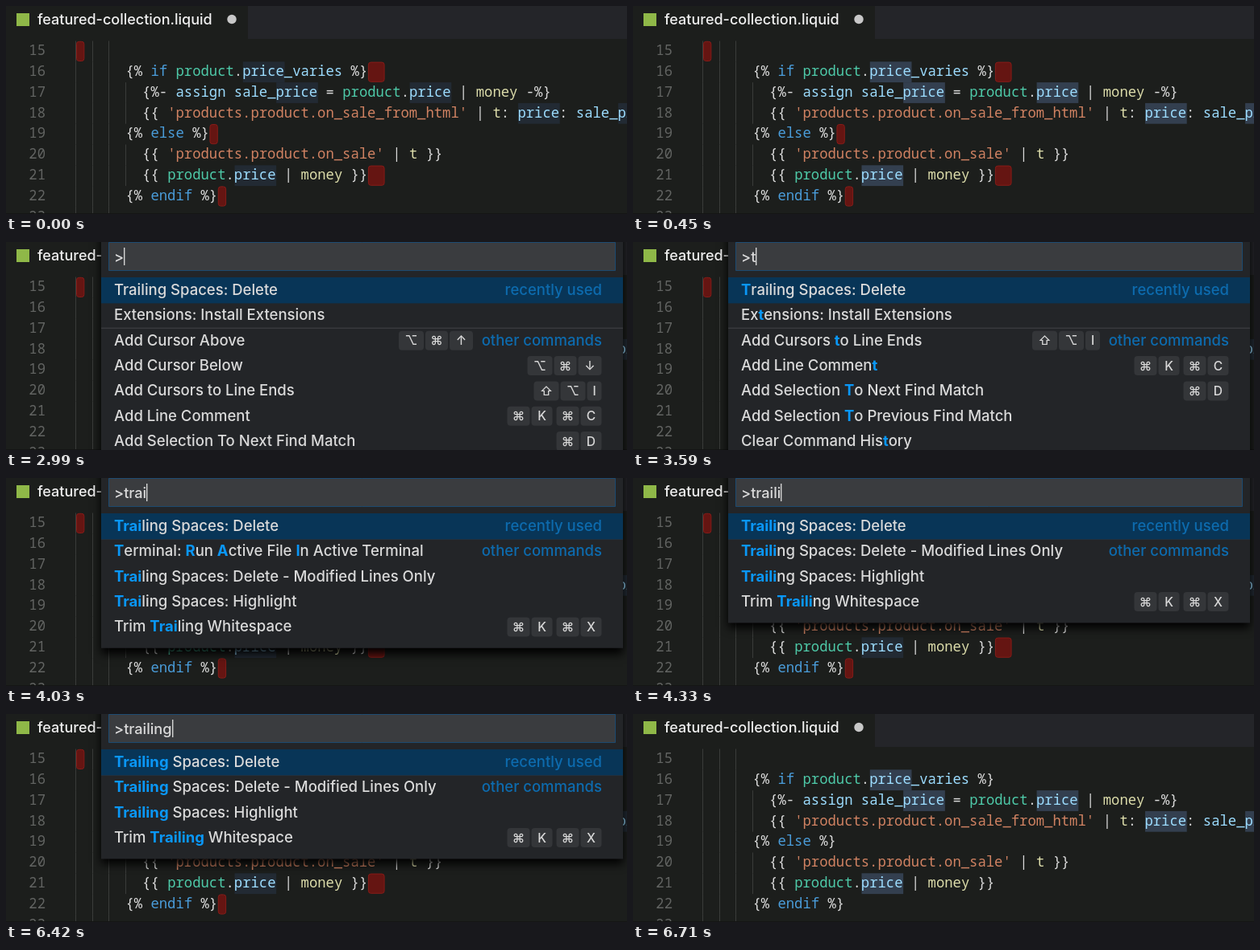
An HTML page with a canvas that plays this animation: 770 px wide and 259 px high, repeating every 9110 ms.

```html
<!DOCTYPE html>
<html lang="en">
<head>
<meta charset="utf-8">
<title>Trailing spaces</title>
<style>
  html, body { margin: 0; height: 100%; overflow: hidden; background: #1c1e1c; }
  canvas { display: block; }
</style>
</head>
<body>
<canvas id="stage" width="770" height="259"></canvas>
<script>
const ctx = document.getElementById('stage').getContext('2d');
const LOOP = 9110;
const CHAR = 10.34, LINE = 25.8, FIRST_TOP = 43.5, CODE_X = 87;
const ROW = 31.35, LIST_TOP = 44, PANEL = { left: 118, right: 765 };
const MONO = '17.23px "Noto Sans Mono", "DejaVu Sans Mono", monospace';
const UI = 'Inter, "DejaVu Sans", sans-serif';

// Code lines: indent in characters, text, number of trailing spaces
const lines = [
  [0, '', 1],
  [6, '{% if product.price_varies %}', 2],
  [8, '{%- assign sale_price = product.price | money -%}', 0],
  [8, "{{ 'products.product.on_sale_from_html' | t: price: sale_price }}", 0],
  [6, '{% else %}', 1],
  [8, "{{ 'products.product.on_sale' | t }}", 0],
  [8, '{{ product.price | money }}', 2],
  [6, '{% endif %}', 1],
  [0, '', 0],
];
const syntax = [
  [/^'/, '#d08262'],
  [/^(if|else|endif)$/, '#4a9cd9'],
  [/^product$/, '#4ec9a8'],
  [/^(money|t)$/, '#dcdcaa'],
  [/^\w/, '#9cdcfe'],
  [/./, '#dcdcdc'],
];

// Palette rows: label with *matched* letters, then shortcut chords
const cursorEnds = ['Add Cursors *t*o Line Ends', '⇧⌥I'];
const lineComment = ['Add Line Commen*t*', '⌘K ⌘C'];
const nextMatch = ['Add Selection *T*o Next Find Match', '⌘D'];
const plain = ([label, keys]) => [label.replaceAll('*', ''), keys];

function paletteRows(typed) {
  const hit = `*${'Trailing'.slice(0, typed.length)}*${'Trailing'.slice(typed.length)}`;
  const top = [hit + ' Spaces: Delete'];
  switch (typed) {
    case '': return [
      ['Trailing Spaces: Delete'], ['Extensions: Install Extensions'],
      ['Add Cursor Above', '⌥⌘↑'], ['Add Cursor Below', '⌥⌘↓'],
      ...[cursorEnds, lineComment, nextMatch].map(plain)];
    case 't': return [
      top, ['Ex*t*ensions: Install Extensions'], cursorEnds, lineComment, nextMatch,
      ['Add Selection *T*o Previous Find Match'], ['Clear Command His*t*ory']];
    case 'tr': return [
      top, ['*T*asks: *R*erun Last Task'], ['*T*asks: *R*un Build Task', '⇧⌘B'],
      ['*T*asks: *R*un Task'], ['*T*asks: *R*un Test Task'],
      ['*T*erminal: *R*ename'], ['*T*erminal: *R*un Active File In Active Terminal']];
  }
  const rows = [top, [hit + ' Spaces: Delete - Modified Lines Only'],
    [hit + ' Spaces: Highlight'], [`Trim ${hit} Whitespace`, '⌘K ⌘X']];
  if (typed === 'trai')
    rows.splice(1, 0, ['*T*erminal: *R*un *A*ctive File *I*n Active Terminal']);
  return rows;
}

// Palette states: start time, typed text, caret visible
const states = [
  [1500, '', true], [2540, '', false], [2990, '', true],
  [3590, 't', true], [3740, 'tr', true], [4030, 'trai', true],
  [4180, 'trail', true], [4330, 'traili', true], [4630, 'trailin', true],
  [4930, 'trailing', true], [5970, 'trailing', false], [6420, 'trailing', true],
];

function rect(x, y, w, h, color) {
  ctx.fillStyle = color;
  ctx.fillRect(x, y, w, h);
}

function roundRect(x, y, w, h, r, fill, stroke) {
  ctx.beginPath();
  ctx.roundRect(x, y, w, h, r);
  ctx.fillStyle = fill;
  ctx.fill();
  if (!stroke) return;
  ctx.strokeStyle = stroke;
  ctx.stroke();
}

function text(str, x, y, color, font, align = 'left') {
  ctx.font = font;
  ctx.fillStyle = color;
  ctx.textAlign = align;
  ctx.fillText(str, x, y);
  return ctx.measureText(str).width;
}

const uiFont = (size = 18.5, weight = 500) => `${weight} ${size}px ${UI}`;

function drawCode(highlight, showTrailing) {
  rect(0, 0, 770, 259, '#1c1e1c');
  lines.forEach(([indent, code, trailing], i) => {
    const top = FIRST_TOP + i * LINE, base = top + 17.7;
    const x = CODE_X + indent * CHAR;
    text(15 + i, 49, base, '#626462', MONO, 'right');
    const guides = indent === 8 ? 4 : 3;
    for (let g = 0; g < guides; g++)
      rect(Math.round(CODE_X + g * 2 * CHAR) - 1, top, 1, LINE, '#3a3c3a');
    for (const m of code.matchAll(/price/g))
      rect(x + m.index * CHAR, top, 5 * CHAR, LINE, highlight);
    for (const m of code.matchAll(/'[^']*'|\w+|[^\w\s']+/g)) {
      const color = syntax.find(([re]) => re.test(m[0]))[1];
      text(m[0], x - .6 + m.index * CHAR, base, color, '500 ' + MONO);
    }
    if (showTrailing && trailing)
      roundRect(x + code.length * CHAR + .5, top + .8, trailing * CHAR - 1, LINE - 1.6, 3, '#651512', '#861c18');
  });
  rect(0, 258, 770, 1, '#141514');
}

function drawTabs() {
  rect(0, 0, 300, 41, '#1c1e1c');
  rect(300, 0, 470, 41, '#242529');
  rect(13, 9, 16, 16, '#8fb848');
  text('featured-collection.liquid', 39, 22.7, '#f0f0f0', uiFont(18));
  ctx.beginPath();
  ctx.arc(280, 16.5, 5.7, 0, 7);
  ctx.fillStyle = '#c8c8c8';
  ctx.fill();
}

function keyWidth(key) {
  if (key === 'I') return 18;
  if (key === '⌘') return 28;
  if ('⌥⇧'.includes(key)) return 31;
  return '↑↓'.includes(key) ? 29 : 26;
}

function drawKeys(keys, right, mid) {
  for (const key of [...keys].reverse()) {
    if (key === ' ') { right -= 3; continue; }
    const w = keyWidth(key);
    roundRect(right - w, mid - 12, w, 24, 4, '#343639');
    text(key, right - w / 2, mid + 5.7, '#d8d8d8', uiFont(15.6), 'center');
    right -= w + 2;
  }
}

function drawPalette(typed, caret) {
  const rows = paletteRows(typed);
  const { left, right } = PANEL, width = right - left;
  const otherStart = typed.length < 2 ? 2 : 1;

  ctx.save();
  ctx.shadowColor = '#000';
  ctx.shadowBlur = 11;
  ctx.shadowOffsetY = 7;
  rect(left, -20, width, LIST_TOP + rows.length * ROW + 31, '#232528');
  ctx.restore();

  roundRect(127.5, .5, 628, 35, 0, '#3a3c3f', '#1c4a70');
  const end = 134 + text('>' + typed, 134, 25, '#dadada', uiFont(18.2));
  if (caret) rect(Math.round(end), 7, 1.4, 22, '#d4d4d4');

  rect(left, LIST_TOP + otherStart * ROW, width, 1, '#434348');
  rect(left, LIST_TOP, width, ROW + 1, '#083557');
  rows.forEach(([label, keys], i) => {
    const top = LIST_TOP + i * ROW, base = top + 22;
    let x = 134;
    label.split('*').forEach((part, n) => {
      const matched = n % 2;
      x += text(part, x, base, matched ? '#0a97f7' : '#dadada', uiFont(18.5, matched ? 700 : 500));
    });
    const group = i === 0 ? 'recently used' : i === otherStart ? 'other commands' : '';
    text(group, 739, base, '#0d6bae', uiFont(), 'right');
    if (keys) drawKeys(keys, i === otherStart ? 579 : 738.5, top + 16);
  });
}

function frame() {
  const t = performance.now() % LOOP;
  const open = t >= 1500 && t < 6710;
  const focused = t >= 450 && !open;
  drawCode(focused ? '#333f4f' : '#222a33', t < 6710);
  drawTabs();
  if (open) {
    const [, typed, caret] = states.findLast(([start]) => t >= start);
    drawPalette(typed, caret);
  }
  requestAnimationFrame(frame);
}
frame();
</script>
</body>
</html>
```
